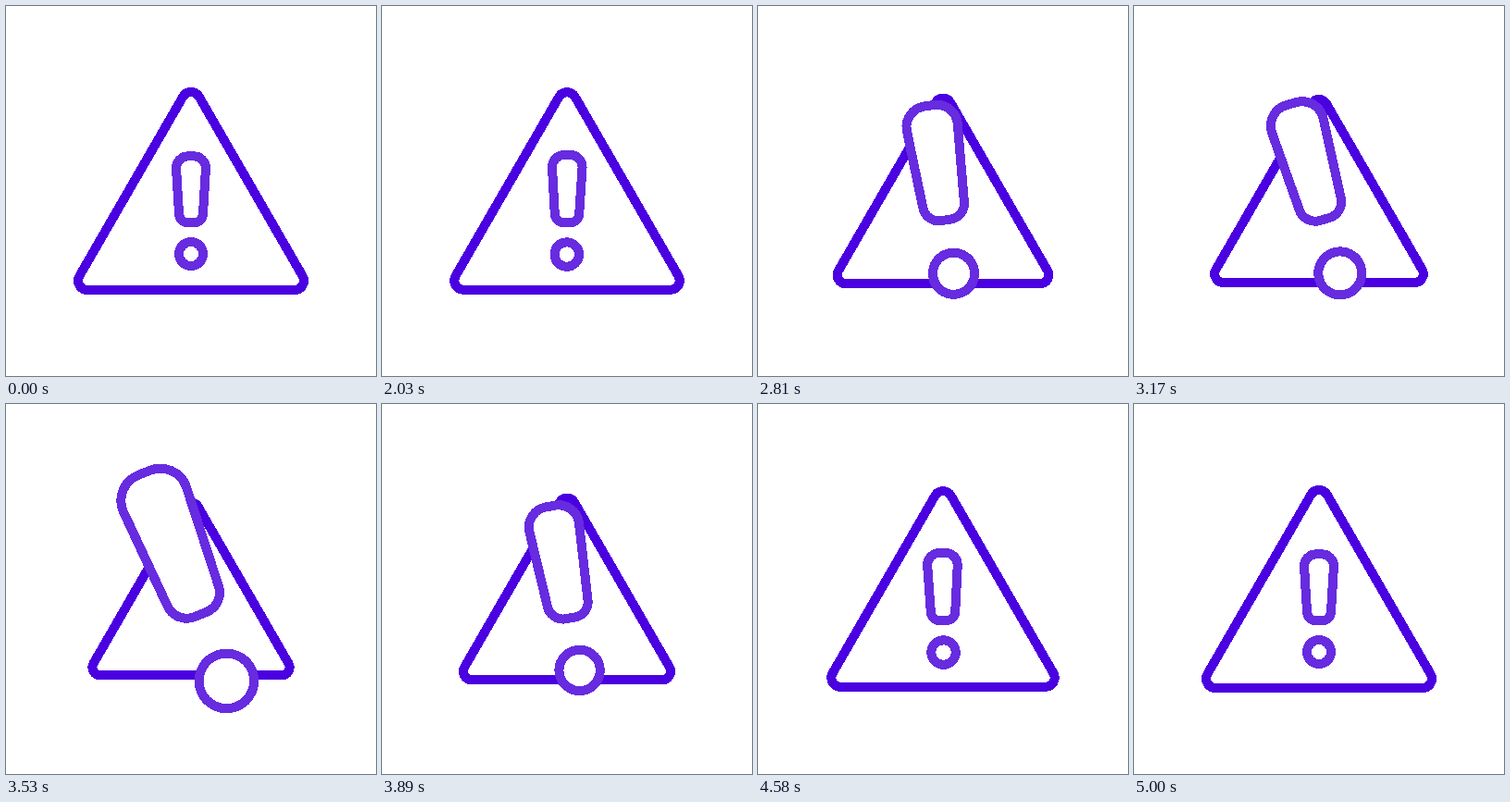
An HTML page for the animation above (5.06 s loop, 400 px wide and 400 px high).

```html
<!DOCTYPE html>
<html lang="en">
<head>
<meta charset="utf-8">
<title>Warning sign</title>
<style>
  html, body { margin: 0; width: 100%; height: 100%; overflow: hidden; background: #fff; }
  svg { display: block; width: 100%; height: 100%; shape-rendering: crispEdges; }
  path, circle { fill: #fff; stroke-width: 10; vector-effect: non-scaling-stroke; }
  #triangle { stroke: #4a00e0; }
  #mark { stroke: #672be0; }
</style>
</head>
<body>
<svg viewBox="0 0 400 400">
  <path id="triangle" d="M79.3 292 L191.3 98 A10 10 0 0 1 208.7 98 L320.7 292 A10 10 0 0 1 312 307 H88 A10 10 0 0 1 79.3 292 Z"/>
  <g id="mark">
    <path d="M-3 -60 H3 A13 13 0 0 1 16 -47 L13 2 A10 10 0 0 1 3 12 H-3 A10 10 0 0 1 -13 2 L-16 -47 A13 13 0 0 1 -3 -60 Z"/>
    <circle cy="45.7" r="13"/>
  </g>
</svg>
<script>
const LOOP = 5060, START = 2030, STEP = 30, END = 5000;
const triangle = document.getElementById('triangle');
const mark = document.getElementById('mark');

const smooth = u => u * u * (3 - 2 * u);

// Eases from pose to pose; a pose lists the time it is reached, then its values.
function poseAt(poses, time) {
  const next = poses.findIndex(pose => pose[0] >= time);
  if (next <= 0) return poses[0].slice(1);
  const from = poses[next - 1], to = poses[next];
  const u = smooth((time - from[0]) / (to[0] - from[0]));
  return from.slice(1).map((value, i) => value + (to[i + 1] - value) * u);
}

// Time, scale: shrink, relax, shrink, overshoot, settle.
const trianglePoses = [
  [2000, 1], [2430, 0.859], [2900, 0.945], [3750, 0.859],
  [4200, 1.118], [4600, 0.988], [END, 1]
];
// Time, scale, angle: lean right, swing over, lean left, overshoot, settle.
const markPoses = [
  [2000, 1, 0], [2430, 2.33, 21], [2940, 1.62, -14], [3630, 2.33, -22],
  [4200, 0.89, 5.5], [4600, 1.02, -0.7], [END, 1, 0]
];

function draw(time) {
  const stepped = time < START ? 0
    : Math.min(END, START + STEP * Math.floor((time - START) / STEP));
  const [scale] = poseAt(trianglePoses, stepped);
  const [size, angle] = poseAt(markPoses, stepped);
  const y = 222.3 - 15.7 * Math.abs(size - 1);
  triangle.setAttribute('transform',
    `translate(200 200) scale(${scale}) translate(-200 -200)`);
  mark.setAttribute('transform',
    `translate(200 ${y}) rotate(${angle}) scale(${size})`);
}

const origin = performance.now();
function tick() {
  draw((performance.now() - origin) % LOOP);
  requestAnimationFrame(tick);
}
tick();
</script>
</body>
</html>
```
